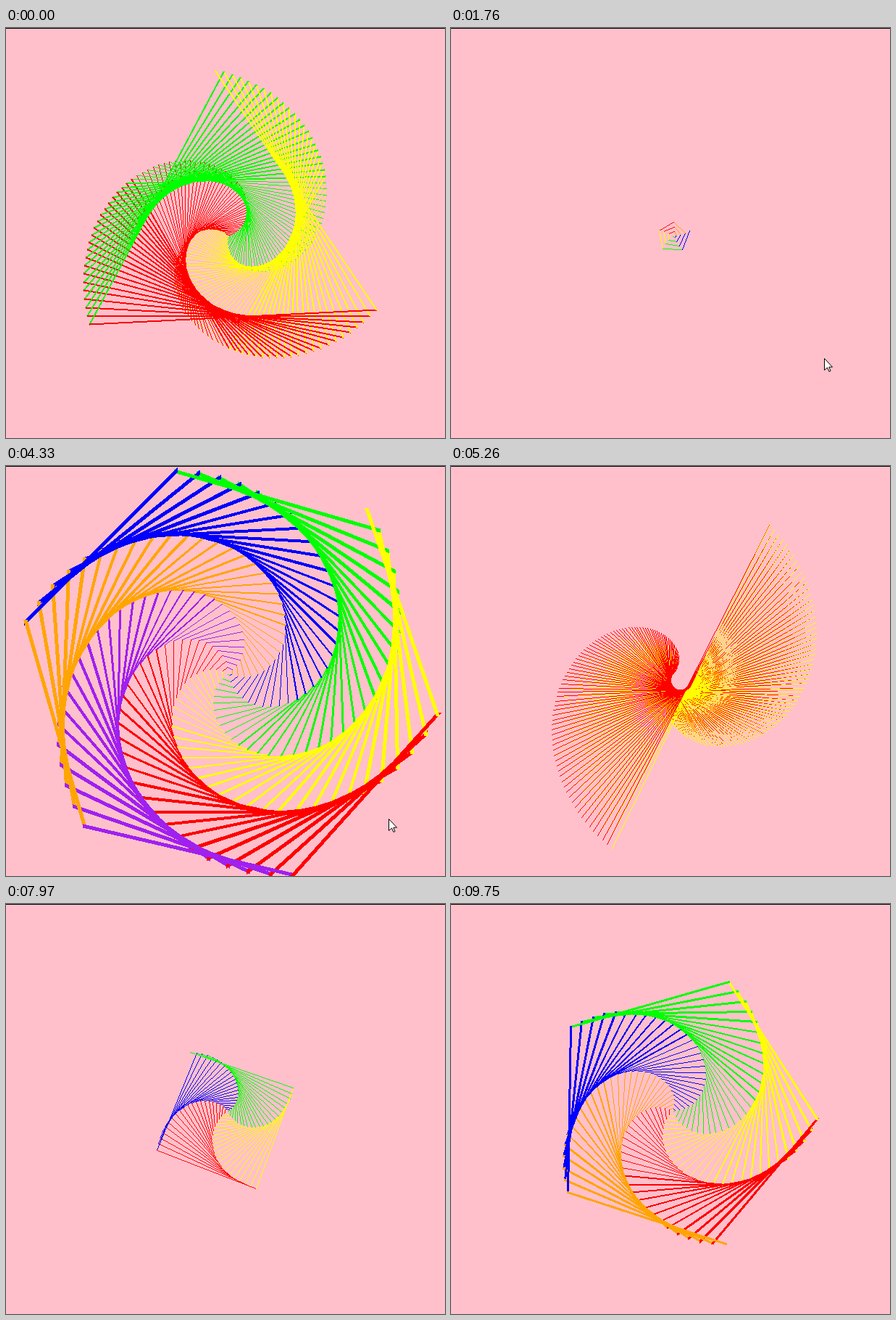
An HTML page with a canvas for the animation above (9830 ms loop, 606 px wide and 565 px high).

```html
<!DOCTYPE html>
<html lang="en">
<head>
<meta charset="utf-8">
<title>Turning spirals</title>
<style>
html, body { margin: 0; width: 100%; height: 100%; overflow: hidden; background: pink; }
canvas { display: block; }
</style>
</head>
<body>
<canvas id="stage" width="606" height="565"></canvas>
<script>
const ctx = document.getElementById('stage').getContext('2d');
const LOOP = 9830, LINES = 200, CX = 306, CY = 286;
const COLORS = ['red', 'yellow', 'lime', 'blue', 'orange', '#a020f0'];
// Each spiral: sides, start ms, end ms, screen updates, head start (in updates)
const HEAD = 0.0143;
const SPIRALS = [
  [3, -520, 0, 8, HEAD],
  [4, 160, 760, 9, HEAD],
  [5, 1760, 2310, 8, HEAD],
  [6, 3250, 3700, 7, 0],
  [2, 4720, 5260, 8, HEAD],
  [3, 6280, 6800, 8, HEAD],
  [4, 7820, 8500, 10, HEAD],
  [5, 9520, 10054, 8, HEAD]
];

// Hard-edged line: one span of pixels per step along the longer axis
function pixelLine(x0, y0, x1, y1, width) {
  const dx = x1 - x0, dy = y1 - y0;
  const steep = Math.abs(dy) > Math.abs(dx);
  const major = Math.max(Math.abs(dx), Math.abs(dy));
  if (!major) return ctx.fillRect(x0, y0, 1, 1);
  const half = width > 1 ? width / 2 * Math.hypot(dx, dy) / major : 0.5;
  const cap = (width - 1) >> 1;
  for (let i = -cap; i <= major + cap; i++) {
    const x = x0 + dx * i / major, y = y0 + dy * i / major;
    const mid = (steep ? x : y) + 0.5;
    const from = Math.round(mid - half), size = Math.round(mid + half) - from;
    if (steep) ctx.fillRect(from, Math.round(y), size, 1);
    else ctx.fillRect(Math.round(x), from, 1, size);
  }
}

function drawSpiral(sides, heading, count) {
  let x = CX, y = CY;
  for (let i = 0; i < count; i++) {
    const angle = (heading + i * (360 / sides + 1)) * Math.PI / 180;
    const length = Math.floor(i * 3 / sides) + i;
    const nx = x + length * Math.cos(angle), ny = y - length * Math.sin(angle);
    const width = Math.max(1, Math.floor((i - 1) * sides / 200));
    ctx.fillStyle = COLORS[i % sides];
    pixelLine(Math.round(x), Math.round(y), Math.round(nx), Math.round(ny), width);
    x = nx;
    y = ny;
  }
}

function pointerAt(t) {
  if (t < 610 || t >= 4720) return null;
  if (t < 685) return [521, 480];
  const k = t < 4180 ? 0 : (Math.floor((t - 4180) / 77) + 1) / 7;
  return [Math.round(515 + 45 * k), Math.round(455 + 110 * k)];
}

const arrow = new Path2D('M.5 .5V16.5L4.5 13L7 18.5L9 17.5L6.8 12.2H11.5Z');

function drawPointer([x, y]) {
  ctx.save();
  ctx.translate(x, y);
  ctx.fillStyle = 'white';
  ctx.fill(arrow);
  ctx.strokeStyle = 'black';
  ctx.stroke(arrow);
  ctx.restore();
}

let shown = '';

function render(t) {
  const index = SPIRALS.findLastIndex(s => s[1] <= t);
  const [sides, start, end, updates, head] = SPIRALS[index];
  const last = updates - 1;
  const step = Math.min(last, Math.floor((t - start) / (end - start) * last + 1e-6));
  // Drawing slows down as the lines get longer
  const count = Math.round(LINES * ((step + head) / (last + head)) ** 0.38);
  const pointer = pointerAt(t);
  const state = [index, count, pointer].join();
  if (state === shown) return;
  shown = state;

  ctx.fillStyle = 'pink';
  ctx.fillRect(0, 0, 606, 565);
  drawSpiral(sides, 165 + 15 * index, count);
  ctx.fillStyle = 'black';
  ctx.fillRect(0, 0, 606, 1);
  if (pointer) drawPointer(pointer);
}

const begin = performance.now();

function tick() {
  render((performance.now() - begin) % LOOP);
  requestAnimationFrame(tick);
}
tick();
</script>
</body>
</html>
```
